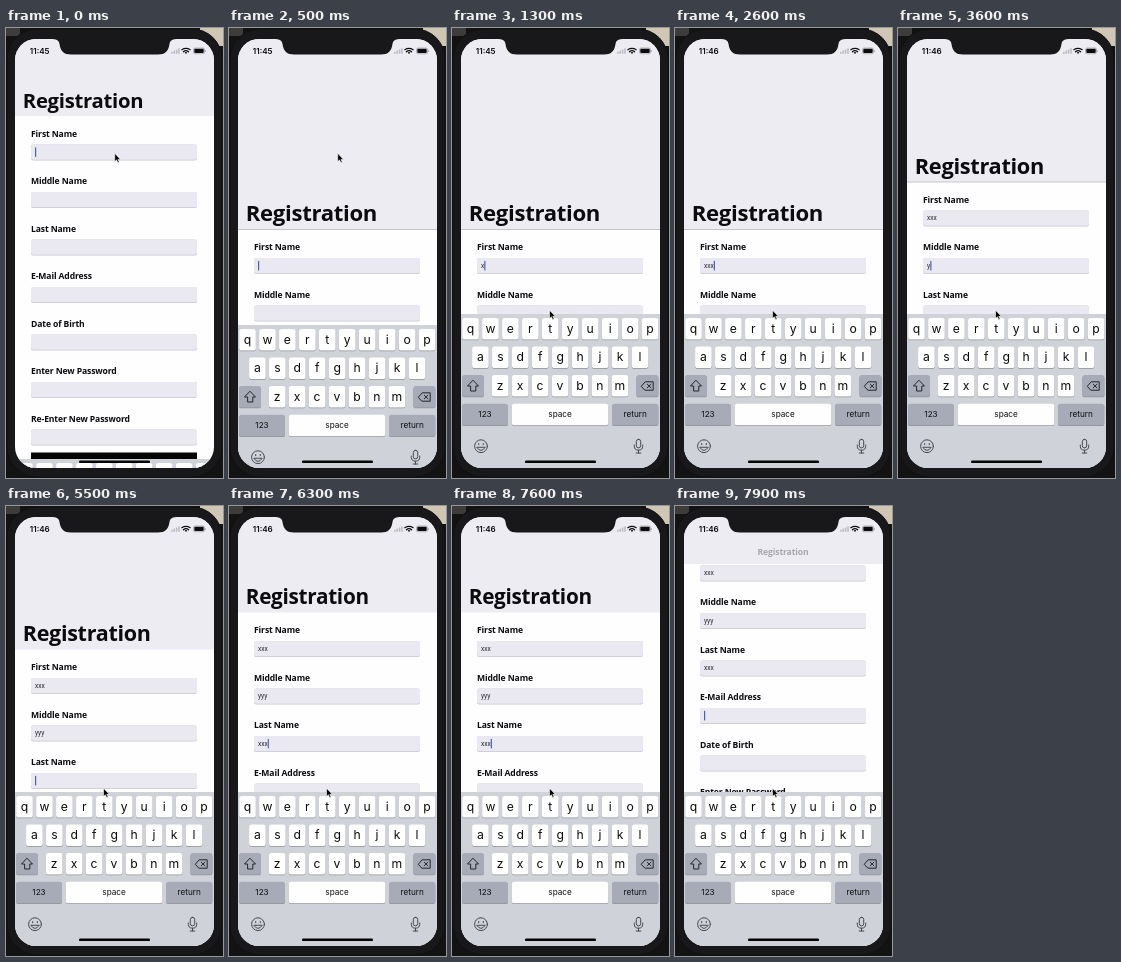
Write an HTML page that moves like this. It is 217 px wide and 450 px high and loops after 8 s.

```html
<!DOCTYPE html>
<html lang="en">
<head>
<meta charset="utf-8">
<title>Registration form</title>
<style>
html, body { margin: 0; width: 100%; height: 100%; overflow: hidden; background: #111; }
svg { display: block; width: 100vw; height: 100vh; }
text { font-family: Inter, Roboto, sans-serif; fill: #0c0c0e; }
.form { font-family: "Open Sans", "Noto Sans", sans-serif; font-weight: 700; letter-spacing: -.014em; }
.value { font: 6.6px Roboto, sans-serif; fill: #26262c; }
.key { font-size: 12.2px; text-anchor: middle; }
.word { font-size: 8.2px; text-anchor: middle; }
.line { fill: none; stroke: #24262b; stroke-width: 1; stroke-linejoin: round; stroke-linecap: round; }
</style>
</head>
<body>
<svg id="stage" viewBox="0 0 217 450">
  <defs>
    <clipPath id="screen"><rect x="9" y="11" width="199" height="429" rx="21"/></clipPath>
  </defs>
  <rect width="217" height="450" fill="#131313"/>
  <path d="M194 0H217V18H194Z" fill="#cfc6b4"/>
  <path d="M0 0H14V8H0Z" fill="#3d3c3b"/>
  <rect x="1" y="1" width="215" height="448" rx="30" fill="#18181a" stroke="#101010"/>
  <g clip-path="url(#screen)">
    <rect x="8" y="10" width="202" height="430" fill="#fefdff"/>
    <g id="content"></g>
    <rect id="header" x="8" y="10" width="202" fill="#edecf3"/>
    <rect id="rule" x="8" width="202" height=".8" fill="#b9b8be"/>
    <text id="title" class="form" font-size="20.300">Registration</text>
    <text id="smallTitle" class="form" x="108" y="48.500" font-size="8.600" text-anchor="middle" style="fill:#a7a6ac">Registration</text>
    <g id="keyboard"></g>
    <rect x="73" y="432.600" width="71" height="2.500" rx="1.200" fill="#050505"/>
  </g>
  <path d="M45 10H172V11C167 11 164 12 163.500 16C162.500 23.500 159 26.500 152 26.500H65C58 26.500 54.500 23.500 53.500 16C53 12 50 11 45 11Z" fill="#18181a"/>
  <text id="clock" x="23.800" y="26" font-size="8.100" font-weight="600"></text>
  <g id="status"></g>
  <path id="mouse" d="M0 0V8.300L1.900 6.600L3.200 9.500L4.600 8.900L3.300 6.100H5.800Z" fill="#050505" stroke="#fff" stroke-width=".6"/>
</svg>
<script>
const $ = id => document.getElementById(id);

function add(parent, tag, attrs, text) {
  const el = document.createElementNS("http://www.w3.org/2000/svg", tag);
  for (const k in attrs) el.setAttribute(k, attrs[k]);
  if (text) el.textContent = text;
  parent.appendChild(el);
  return el;
}

// Form
const PITCH = 47.5;
const labels = ["First Name", "Middle Name", "Last Name", "E-Mail Address",
  "Date of Birth", "Enter New Password", "Re-Enter New Password"];
const content = $("content");
const values = labels.map((label, i) => {
  const y = i * PITCH;
  add(content, "text", { class: "form", x: 25, y: y + 108.9, "font-size": 8.6 }, label);
  add(content, "rect", { x: 25, y: y + 116.6, width: 166, height: 15.8, rx: 2.5, fill: "#c6c5ce" });
  add(content, "rect", { x: 25, y: y + 116.4, width: 166, height: 15.3, rx: 2.5, fill: "#eae9f2" });
  return add(content, "text", { class: "value", x: 29, y: y + 126.2 });
});
add(content, "rect", { x: 25, y: 424.5, width: 166, height: 22, fill: "#050505" });
const caret = add(content, "rect", { width: 1.2, height: 9.5, fill: "#4a62b4" });

// Keyboard, drawn in its raised place
const keyboard = $("keyboard");
add(keyboard, "rect", { x: 8, y: 286, width: 202, height: 160, fill: "#cfd2d9" });

function key(x, y, width, fill) {
  const box = { x, width, height: 21.5, rx: 2.6 };
  add(keyboard, "rect", { ...box, y: y + .8, fill: "#8f9197" });
  add(keyboard, "rect", { ...box, y, fill });
}
["qwertyuiop", "asdfghjkl", "zxcvbnm"].forEach((row, r) => {
  const y = 290 + r * 28.5, first = [18.5, 28.4, 48.2][r];
  [...row].forEach((c, i) => {
    const x = first + i * 19.95;
    key(x - 8.3, y, 16.6, "#fefefe");
    add(keyboard, "text", { class: "key", x, y: y + 14.8 }, c);
  });
});
const GREY = "#a6abb7";
key(10, 347, 22, GREY);
key(184.4, 347, 22, GREY);
[["123", 10, 46, GREY], ["space", 59.8, 96.5, "#fefefe"], ["return", 160, 46.3, GREY]]
  .forEach(([word, x, w, fill]) => {
    key(x, 375.8, w, fill);
    add(keyboard, "text", { class: "word", x: x + w / 2, y: 389.4 }, word);
  });
const draw = (d, extra) => add(keyboard, "path", { class: "line", d, ...extra });
draw("M21.2 352.5L26.5 358H23.8V363H18.6V358H15.9Z");
draw("M189.5 358L193.2 353.8H201.2V362.2H193.2ZM195.3 356.2L198.9 359.8M198.9 356.2L195.3 359.8");
const soft = { style: "stroke:#464951" };
add(keyboard, "circle", { class: "line", cx: 29, cy: 418.2, r: 6.4, ...soft });
draw("M26.7 415.5V416.7M31.3 415.5V416.7M25 419.6Q29 425.5 33 419.6Z", soft);
add(keyboard, "rect", { class: "line", x: 184.3, y: 411.3, width: 4.4, height: 8.6, rx: 2.2, ...soft });
draw("M182.3 417V418.2Q182.3 422.2 186.5 422.2T190.7 418.2V417M186.5 422.2V425M184.2 425H188.8", soft);

// Status icons
const status = $("status");
for (let i = 0; i < 4; i++) {
  const h = 2 + i * 1.2;
  add(status, "rect", { x: 165 + i * 2.4, y: 25.8 - h, width: 1.6, height: h, rx: .4, fill: "#bdbcc3" });
}
[[4.2, 20.9], [2.6, 23]].forEach(([r, y]) => add(status, "path", {
  class: "line", d: `M${180 - r} ${y + .8}Q180 ${y - 1.7} ${180 + r} ${y + .8}`, style: "stroke:#0c0c0e;stroke-width:1.2"
}));
add(status, "path", { d: "M178.6 24.6Q180 23.5 181.4 24.6L180 26.1Z", fill: "#0c0c0e" });
add(status, "rect", { x: 187.5, y: 20, width: 11, height: 5.8, rx: 1.6, fill: "none", stroke: "#8d8c92", "stroke-width": .6 });
add(status, "rect", { x: 188.3, y: 20.8, width: 9.4, height: 4.2, rx: .9, fill: "#0c0c0e" });
add(status, "rect", { x: 199, y: 22, width: .8, height: 1.9, rx: .4, fill: "#8d8c92" });

// Timeline
const STEP = 100, LOOP = 8000;
const clamp = v => Math.max(0, Math.min(1, v));
const easeOut = p => 1 - (1 - p) ** 2;
const easeBoth = p => p * p * (3 - 2 * p);
const mix = (a, b, p) => a + (b - a) * p;

// Last value whose time has come
const at = (track, t) => track.reduce((v, [time, next]) => t >= time ? next : v, track[0][1]);

const scrolls = [[0, 113.5], [3000, 112.3], [3100, 111], [3300, 66], [5200, 60], [5300, 55.5], [5700, 18.5], [7900, -57]];
const focus = [[0, 0], [3000, 1], [5200, 2], [7900, 3]];
const typed = [
  [[0, ""], [1300, "x"], [1400, "xx"], [1500, "xxx"]],
  [[0, ""], [3300, "y"], [3900, "yy"], [4000, "yyy"]],
  [[0, ""], [5700, "xxx"]]
];
const blink = [[0, 1], [1700, 0], [1900, .5], [2000, 1], [2300, .4], [2400, 0], [2500, .5], [2600, 1],
  [3700, .4], [3900, 1], [4400, 0], [4600, .5], [4700, 1], [4900, .4], [5000, 0], [5200, 1],
  [6300, .9], [6400, .4], [6500, 0], [6900, .5], [7000, 1]];

function render(now) {
  const t = Math.floor((now % LOOP) / STEP) * STEP;
  const rise = easeOut(clamp(t / 500));
  const scroll = t < 500 ? 113.5 * rise : at(scrolls, t);
  const drop = t < 800 ? mix(145, 11, rise) : 0;

  content.setAttribute("transform", `translate(0 ${scroll})`);
  keyboard.setAttribute("transform", `translate(0 ${drop})`);

  const bottom = Math.max(58, 88 + scroll);
  const collapsed = scroll < -30;
  $("header").setAttribute("height", bottom - 10);
  $("rule").setAttribute("y", bottom - .4);
  $("rule").setAttribute("opacity", scroll > 60 ? 1 : 0);
  const scale = 1 + Math.min(.09, Math.max(0, scroll) * .0011);
  $("title").setAttribute("transform", `translate(16.8 ${79.8 + scroll}) scale(${scale})`);
  $("title").setAttribute("opacity", collapsed ? 0 : 1);
  $("smallTitle").setAttribute("opacity", collapsed ? 1 : 0);

  typed.forEach((track, i) => values[i].textContent = at(track, t));
  const field = at(focus, t);
  caret.setAttribute("x", 29 + 3.25 * values[field].textContent.length);
  caret.setAttribute("y", 119.4 + field * PITCH);
  caret.setAttribute("opacity", at(blink, t));

  $("clock").textContent = t < 1900 ? "11:45" : "11:46";
  const glide = easeBoth(clamp((t - 800) / 500));
  $("mouse").setAttribute("transform", `translate(${mix(108.7, 97.5, glide)} ${mix(125.3, 282.2, glide)})`);
}

const start = performance.now();
function tick() {
  render(performance.now() - start);
  requestAnimationFrame(tick);
}
tick();
</script>
</body>
</html>
```
